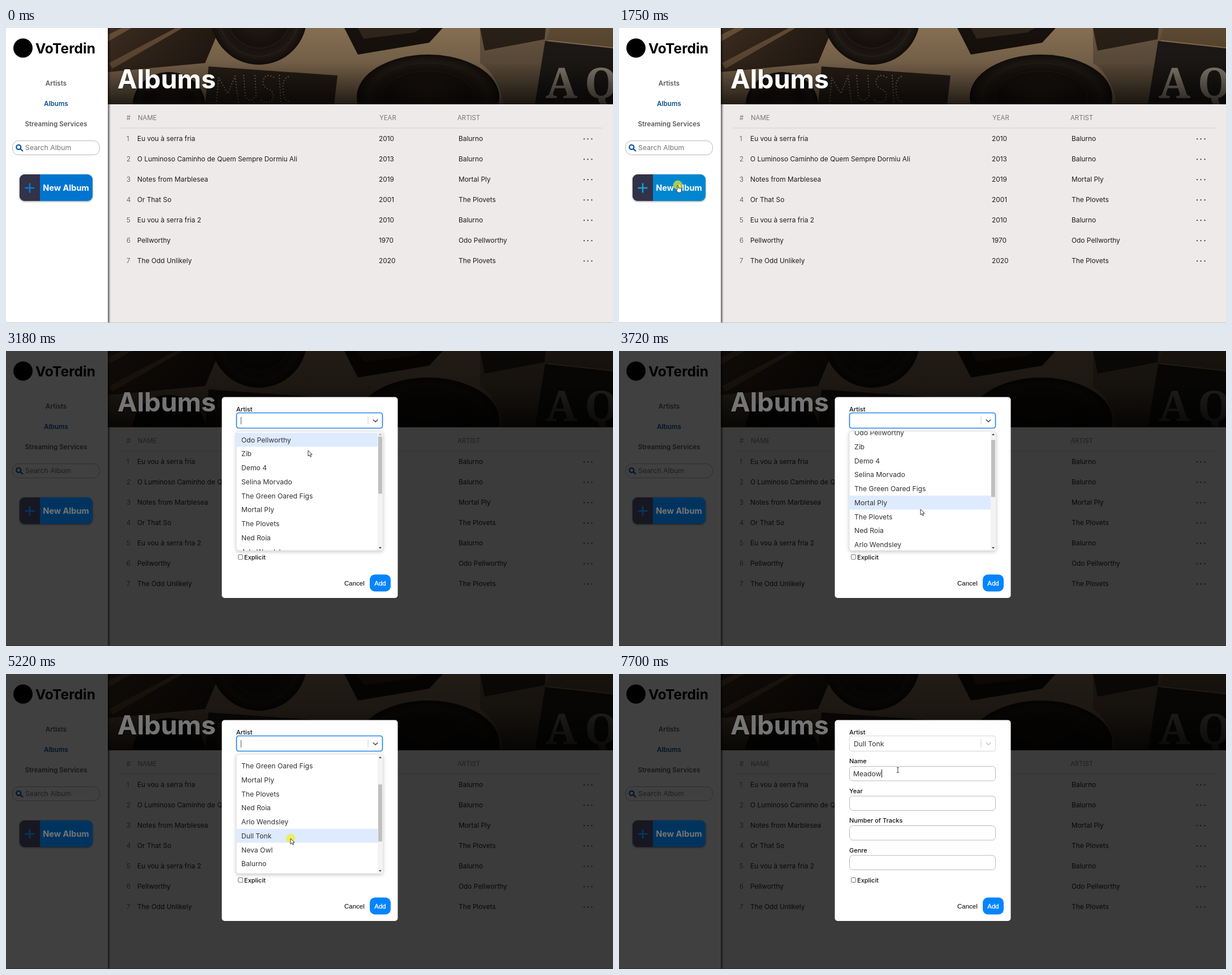
An HTML page for the animation above (8000 ms loop, 1073 px wide and 522 px high).

```html
<!DOCTYPE html>
<html lang="en">
<head>
<meta charset="utf-8">
<title>Album catalogue</title>
<style>
  html, body { margin: 0; width: 100%; height: 100%; overflow: hidden; background: #fff; }
  svg { display: block; width: 100%; height: 100%; font-family: Inter, "Open Sans", sans-serif; }
  text { white-space: pre; }
  .nav { font-size: 11.7px; font-weight: 600; fill: #5a5a5a; text-anchor: middle; }
  .nav.on { fill: #0a4f92; }
  .head { font-size: 11.4px; fill: #777; }
  .row { font-size: 11.9px; fill: #1c1c1c; }
  .num { font-size: 11.8px; font-weight: 300; fill: #444; }
  .label { font-size: 11px; font-weight: 500; fill: #111; }
  .item { font-size: 12.2px; fill: #333; }
  .arial { font-family: "Liberation Sans", Arial, sans-serif; font-size: 11.5px; }
</style>
</head>
<body>
<svg id="stage" viewBox="0 0 1073 522" preserveAspectRatio="none">
  <defs>
    <linearGradient id="fade" x2="0" y2="1">
      <stop offset="0" stop-opacity="0"/><stop offset=".45" stop-opacity=".15"/><stop offset="1" stop-opacity=".75"/>
    </linearGradient>
    <linearGradient id="edge">
      <stop offset="0" stop-opacity=".6"/><stop offset="1" stop-opacity="0"/>
    </linearGradient>
    <linearGradient id="sleeve">
      <stop offset="0" stop-color="#3b2c1f"/><stop offset="1" stop-color="#211811"/>
    </linearGradient>
    <radialGradient id="vinyl">
      <stop offset="0" stop-color="#261d16"/><stop offset=".6" stop-color="#17110d"/>
      <stop offset=".85" stop-color="#211a14"/><stop offset="1" stop-color="#120e0a"/>
    </radialGradient>
    <filter id="soft" x="-20%" y="-20%" width="140%" height="150%">
      <feDropShadow dx="0" dy="1" stdDeviation="1.6" flood-opacity=".45"/>
    </filter>
    <filter id="lift" x="-10%" y="-10%" width="120%" height="125%">
      <feDropShadow dx="0" dy="2" stdDeviation="3" flood-opacity=".22"/>
    </filter>
    <clipPath id="photoClip"><rect x="180" width="893" height="135"/></clipPath>
    <clipPath id="buttonClip"><rect x="24" y="259" width="129" height="47" rx="9"/></clipPath>
    <clipPath id="menuClip"><rect x="407" y="142" width="259" height="211" rx="4"/></clipPath>
  </defs>

  <rect width="1073" height="522" fill="#eeeaea"/>
  <g clip-path="url(#photoClip)">
    <rect x="180" width="893" height="135" fill="#866e53"/>
    <path d="M180 0H378L352 62L180 78Z" fill="url(#sleeve)"/>
    <path d="M180 12L205 0H222L180 24ZM182 62L300 0H312L188 72Z" fill="#8a6c4c" opacity=".55"/>
    <circle cx="447" cy="-20" r="85" fill="url(#vinyl)"/>
    <g fill="none" stroke="#51412f" opacity=".4"><circle cx="447" cy="-20" r="70"/><circle cx="447" cy="-20" r="56"/></g>
    <path d="M598 0H772L748 26L622 47Z" fill="#17110d"/>
    <path d="M622 0H735L722 8L632 19Z" fill="#30251b"/>
    <path d="M358 68L586 84L580 135H352Z" fill="#2a2118"/>
    <ellipse cx="288" cy="136" rx="64" ry="58" fill="url(#vinyl)"/>
    <ellipse cx="746" cy="122" rx="126" ry="75" fill="url(#vinyl)"/>
    <g fill="none" stroke="#4a3b2a" opacity=".35"><ellipse cx="746" cy="122" rx="104" ry="60"/><ellipse cx="746" cy="122" rx="82" ry="46"/></g>
    <path d="M838 0H962L938 135H880Q868 80 838 62Z" fill="#665440"/>
    <path d="M838 0H954L952 20L846 40Z" fill="#2a2017"/>
    <path d="M953 23L1073 36V135H935Z" fill="#1e1a17"/>
    <path d="M962 0H1073V34L956 21Z" fill="#5d4932"/>
    <path d="M372 134L376 88L392 116L405 85L411 132M420 84L423 120Q430 135 442 120L440 84M473 87Q457 78 454 96Q456 106 466 109Q477 116 470 128Q460 135 451 127M483 84L486 132M499 86Q488 90 490 110Q491 130 500 130"
      fill="none" stroke="#c3b294" stroke-width="2" stroke-linecap="round" stroke-dasharray=".1 5" opacity=".75"/>
    <g font-family="Noto Serif, serif" font-weight="700" font-size="74" fill="#c9bda8" opacity=".7">
      <text x="954" y="124">A</text><text x="1023" y="124">Q</text>
    </g>
    <rect x="180" width="893" height="135" fill="url(#fade)"/>
  </g>
  <text id="title" x="197" y="107" font-size="46.5" font-weight="700" fill="#fff" filter="url(#soft)">Albums</text>
  <g id="table"></g>

  <rect width="180" height="522" fill="#fff"/>
  <rect x="180" width="5" height="522" fill="url(#edge)"/>
  <rect y="521" width="1073" height="1" fill="#c4c2c2"/>
  <circle cx="30" cy="35.5" r="17"/>
  <text x="52" y="45" font-size="24.6" font-weight="700">VoTerdin</text>
  <text class="nav" x="88.5" y="102">Artists</text>
  <text class="nav on" x="88.5" y="138">Albums</text>
  <text class="nav" id="streaming" x="88.5" y="174">Streaming Services</text>
  <rect x="11.5" y="199.5" width="154" height="25" rx="11" fill="#fff" stroke="#b8b8b8"/>
  <g fill="none" stroke="#0a56a0" stroke-width="2.3"><circle cx="22.3" cy="210.8" r="4"/><path d="M25.3 213.8L30 218"/></g>
  <text x="34" y="216" font-size="12.3" fill="#757575">Search Album</text>
  <g id="newAlbum">
    <g filter="url(#soft)"><g clip-path="url(#buttonClip)">
      <rect id="button" x="24" y="259" width="129" height="47"/>
      <rect x="24" y="259" width="36" height="47" fill="#32324a"/>
    </g></g>
    <path id="plus" d="M33.5 283H50.5M42 274.5V291.5" stroke-width="2.4"/>
    <text x="106" y="288" font-size="14.5" font-weight="700" fill="#fff" text-anchor="middle">New Album</text>
  </g>

  <g id="dialog">
    <rect width="1073" height="522" opacity=".75"/>
    <g opacity=".28"><use href="#title"/><use href="#newAlbum"/></g>
    <rect x="381.5" y="81.5" width="311" height="355.5" rx="5" fill="#fff"/>
    <g id="fields"></g>
    <rect id="select" x="407.5" y="109.5" width="258" height="27" rx="4" fill="#fff"/>
    <path d="M640 116V130" stroke="#ccc"/>
    <path id="chevron" d="M649.3 121.8L653 125.4L656.7 121.8" fill="none" stroke-width="1.7" stroke-linecap="round"/>
    <text id="value" class="item" x="415" y="127.5">Dull Tonk</text>
    <path id="selectCaret" d="M415.5 117V130" stroke="#555"/>
    <text id="typed" class="item" x="414" y="180.5"></text>
    <path id="nameCaret" d="M0 169V183" stroke="#111"/>
    <rect x="410.5" y="360.5" width="8" height="8" rx="1.5" fill="#fff" stroke="#767676"/>
    <text class="label" x="421" y="369">Explicit</text>
    <text class="arial" x="598" y="414.5">Cancel</text>
    <rect x="643" y="395.5" width="37" height="30" rx="9" fill="#0584ff"/>
    <text class="arial" x="661.5" y="414.5" text-anchor="middle" fill="#fff" stroke="#fff" stroke-width=".3">Add</text>
    <g id="menu">
      <rect x="407" y="142" width="259" height="211" rx="4" fill="#fff" stroke="#ddd" filter="url(#lift)"/>
      <g clip-path="url(#menuClip)">
        <g id="list"><rect id="hover" x="407" width="250" height="24.75" fill="#deebff"/></g>
        <rect x="657" y="142" width="9" height="211" fill="#f3f3f3"/>
        <rect id="thumb" x="658" width="7" height="101" fill="#bfbfbf"/>
        <path id="arrowUp" d="M659 149L661.5 146L664 149Z"/>
        <path d="M659 347L661.5 350L664 347Z" fill="#444"/>
      </g>
    </g>
  </g>

  <circle id="spot" r="8.2" fill="#f4ee1c" fill-opacity=".68"/>
  <g id="pointer" fill="#fff" stroke="#222" stroke-width=".9" stroke-linejoin="round">
    <path id="arrow" d="M0 0V10L2.4 7.9L4 11.6L5.7 10.8L4.1 7.2H7.2Z"/>
    <path id="hand" d="M-1 1Q0-.6 1 1V5L5.6 6Q6.8 6.4 6.6 8L5.8 13.2H.2L-2.8 9.2Q-3.4 7.4-1 8.4Z"/>
    <path id="beam" d="M-2-4.5H-.5L0-4L.5-4.5H2M0-4V4M-2 4.5H-.5L0 4L.5 4.5H2" fill="none"/>
  </g>
</svg>
<script>
const $ = id => document.getElementById(id);
const LOOP = 8000, ROW = 24.75, LIST_TOP = 144.6;
const OPEN = 1810, FOCUS = 3020, CHOSEN = 5290, NAMED = 6040;

const albums = [
  ["Eu vou à serra fria", 2010, "Balurno"],
  ["O Luminoso Caminho de Quem Sempre Dormiu Ali", 2013, "Balurno"],
  ["Notes from Marblesea", 2019, "Mortal Ply"],
  ["Or That So", 2001, "The Plovets"],
  ["Eu vou à serra fria 2", 2010, "Balurno"],
  ["Pellworthy", 1970, "Odo Pellworthy"],
  ["The Odd Unlikely", 2020, "The Plovets"]
];
const artists = ["Odo Pellworthy", "Zib", "Demo 4", "Selina Morvado", "The Green Oared Figs",
  "Mortal Ply", "The Plovets", "Ned Roia", "Arlo Wendsley", "Dull Tonk", "Neva Owl", "Balurno"];

const label = (cls, x, y, s) => `<text class="${cls}" x="${x}" y="${y}">${s}</text>`;

$("table").innerHTML =
  [["#", 213], ["NAME", 233], ["YEAR", 660], ["ARTIST", 798]].map(([s, x]) => label("head", x, 163, s)).join("") +
  '<path d="M202 177H1054" stroke="#d4d0d0"/>' +
  albums.map(([name, year, artist], i) => {
    const y = 199.5 + 36 * i;
    return label("num", 213, y, i + 1) + label("row", 232, y, name) + label("row", 659, y, year) +
      label("row", 800, y, artist) +
      [1022, 1028.5, 1035.5].map(x => `<circle cx="${x}" cy="${y - 3.2}" r="1.1" fill="#222"/>`).join("");
  }).join("");

$("fields").innerHTML = label("label", 407, 107, "Artist") +
  ["Name", "Year", "Number of Tracks", "Genre"].map((s, i) => {
    const y = 163.5 + 52.5 * i;
    return label("label", 407, y - 5.5, s) +
      `<rect x="407.5" y="${y}" width="258" height="25.5" rx="6" fill="#fff" stroke="#b9b9b9"/>`;
  }).join("");

$("list").insertAdjacentHTML("beforeend",
  artists.map((s, i) => label("item", 416, 161.6 + ROW * i, s)).join(""));

// Pointer poses: time, x, y
const path = [
  [190, 0, 470], [930, 92, 158], [1000, 92, 158], [1410, 104, 278], [2010, 104, 278],
  [2080, 116, 292], [2420, 551, 117], [2560, 551, 117], [2960, 549, 121], [3020, 549, 121],
  [3180, 534, 176], [3380, 534, 180], [3660, 533, 280], [4190, 533, 280], [4540, 493, 231],
  [4900, 503, 287], [5020, 503, 291], [5490, 503, 291], [5970, 491.5, 170], [6040, 491.5, 170], [6230, 493, 170]
];
const clicks = [[1750, OPEN], [2960, 3100], [5220, CHOSEN], [NAMED, 6170]];
const keys = [[6560, "M"], [6760, "e"], [7020, "a"], [7120, "d"], [7230, "o"], [7700, "w"]];

const ramp = (t, a, b) => Math.min(1, Math.max(0, (t - a) / (b - a)));
const ease = (t, a, b) => { const u = ramp(t, a, b); return u * u * (3 - 2 * u); };
const mix = (a, b, u) => `rgb(${a.map((v, i) => Math.round(v + (b[i] - v) * u))})`;
const show = (id, on) => $(id).setAttribute("visibility", on ? "inherit" : "hidden");
const set = (id, attr, v) => $(id).setAttribute(attr, v);
const inside = (x, y, l, t, r, b) => x >= l && x <= r && y >= t && y <= b;

function pointerAt(t) {
  const i = path.findIndex(p => p[0] > t);
  if (i < 0) return path.at(-1).slice(1);
  if (i === 0) return path[0].slice(1);
  const [a, x0, y0] = path[i - 1], [b, x1, y1] = path[i], u = ease(t, a, b);
  return [x0 + (x1 - x0) * u, y0 + (y1 - y0) * u];
}

function pointerKind(t, x, y) {
  if (t < OPEN) {
    if (inside(x, y, 32, 158, 145, 178) || inside(x, y, 24, 259, 153, 306)) return "hand";
    return inside(x, y, 11, 199, 166, 225) ? "beam" : "arrow";
  }
  if (inside(x, y, 408, 109, 639, 136)) return "beam";
  return t >= CHOSEN && inside(x, y, 408, 163, 666, 189) ? "beam" : "arrow";
}

function draw(t) {
  const [x, y] = pointerAt(t), kind = pointerKind(t, x, y);
  show("pointer", t >= 190);
  set("pointer", "transform", `translate(${x} ${y})`);
  for (const k of ["arrow", "hand", "beam"]) show(k, t >= 190 && k === kind);
  show("spot", clicks.some(([a, b]) => t >= a && t < b));
  set("spot", "cx", x);
  set("spot", "cy", y);

  const lit = t < OPEN ? ramp(t, 1280, 1410) : 0;
  set("button", "fill", mix([0, 117, 208], [3, 134, 208], lit));
  set("plus", "stroke", mix([10, 122, 214], [18, 165, 221], lit));
  $("streaming").classList.toggle("on", t < OPEN && inside(x, y, 32, 158, 145, 178));

  show("dialog", t >= OPEN);
  const focus = ramp(t, FOCUS - 60, FOCUS + 40) * (1 - ramp(t, NAMED + 30, NAMED + 150));
  set("select", "stroke", mix([212, 212, 212], [38, 132, 235], focus));
  set("select", "stroke-width", 1 + focus * .7);
  set("chevron", "stroke", mix([204, 204, 204], [85, 85, 85], focus));
  show("value", t >= CHOSEN);
  show("selectCaret", t >= FOCUS && t < 5520 && (t - FOCUS) % 1000 < 500);

  show("menu", t >= FOCUS && t < CHOSEN);
  const scroll = 93.5 * ease(t, 3620, 4060);
  const row = t < 3200 ? 0 : Math.max(0, Math.floor((y - LIST_TOP + scroll) / ROW));
  set("list", "transform", `translate(0 ${-scroll})`);
  set("hover", "y", LIST_TOP + row * ROW);
  set("thumb", "y", 151.5 + scroll * .47);
  set("arrowUp", "fill", scroll ? "#444" : "#a3a3a3");

  const pressed = keys.filter(([at]) => t >= at);
  const word = pressed.map(k => k[1]).join("");
  if ($("typed").textContent !== word) $("typed").textContent = word;
  const touched = pressed.length ? pressed.at(-1)[0] : NAMED;
  show("nameCaret", t >= NAMED && (t - touched) % 1000 < 520);
  const end = word ? $("typed").getComputedTextLength() : 0;
  set("nameCaret", "transform", `translate(${414.5 + Math.round(end)} 0)`);
}

const start = performance.now();
function tick() {
  draw((performance.now() - start) % LOOP);
  requestAnimationFrame(tick);
}
tick();
</script>
</body>
</html>
```
